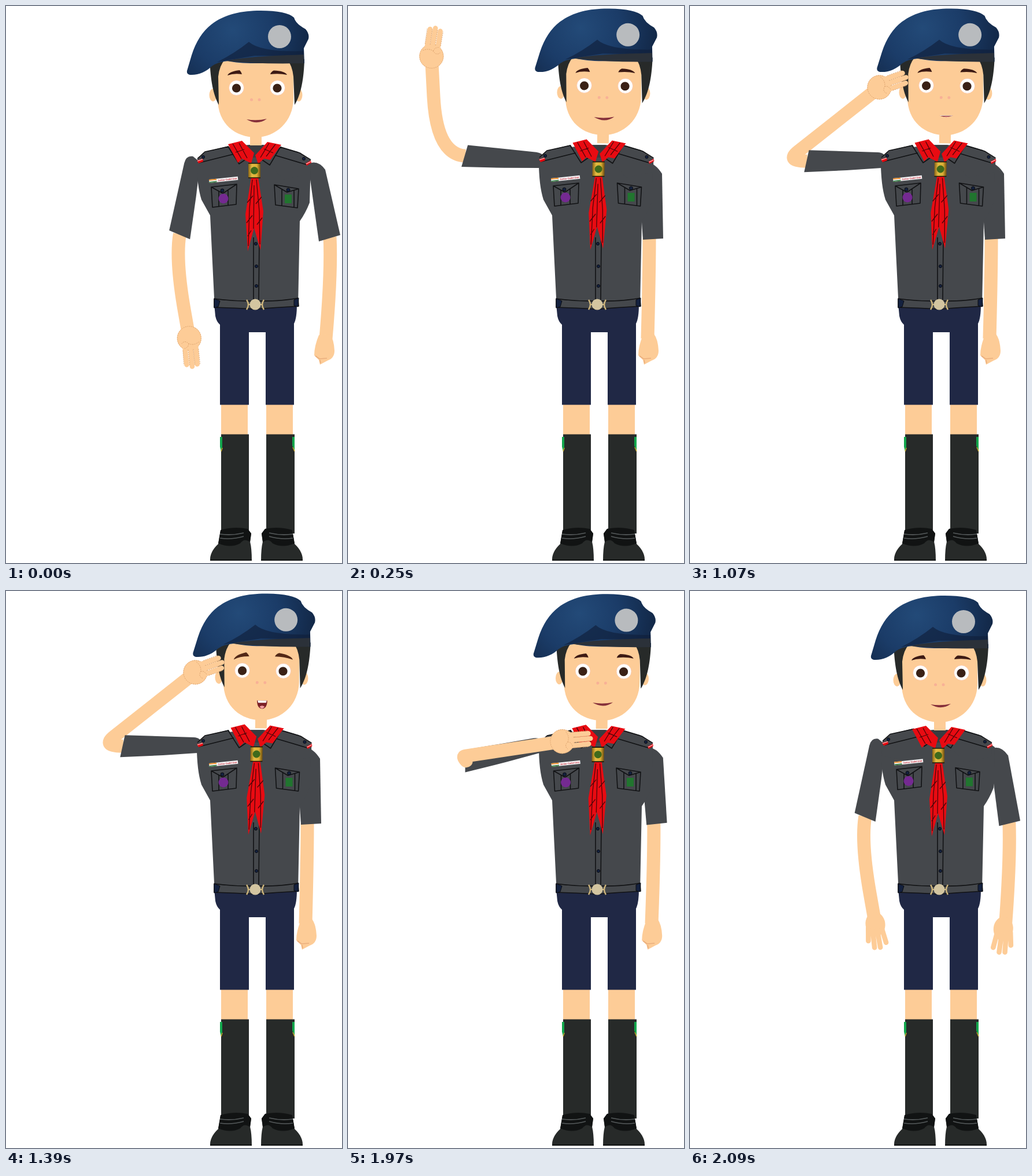
These frames come from a looping animation (581x963 px, 2.14 s). An HTML page:

```html
<!DOCTYPE html>
<html lang="en">
<head>
<meta charset="utf-8">
<title>Scout salute</title>
<style>
  html, body { margin: 0; width: 100%; height: 100%; overflow: hidden; background: #fff; }
  svg { display: block; width: 100vw; height: 100vh; }
  .skin { fill: #fdcc97; }
  .limb { fill: none; stroke: #fdcc97; stroke-width: 23; stroke-linejoin: round; }
  .shirt { fill: #45484c; }
  .navy { fill: #202845; }
  .dark { fill: #272a29; }
  .button { fill: #14213f; stroke: #0b0d12; stroke-width: 1; }
  .red { fill: #e80b12; }
  .seam { fill: none; stroke: #111214; stroke-width: 1.6; stroke-linejoin: round; }
  .crease { fill: none; stroke: #4d0508; stroke-width: 1.3; }
  .finger { fill: none; stroke: #fdcc97; stroke-width: 8.6; stroke-linecap: round; }
  .edge { fill: none; stroke: #d69b66; stroke-width: .8; stroke-dasharray: 2 1.5; }
</style>
</head>
<body>
<svg viewBox="0 0 581 963" preserveAspectRatio="none">
  <defs>
    <radialGradient id="felt" gradientUnits="userSpaceOnUse" cx="392" cy="42" r="135">
      <stop offset="0" stop-color="#234a78"/>
      <stop offset=".5" stop-color="#1b3c68"/>
      <stop offset="1" stop-color="#122746"/>
    </radialGradient>
    <linearGradient id="gold">
      <stop offset="0" stop-color="#8a6414"/>
      <stop offset=".3" stop-color="#e3bb42"/>
      <stop offset=".7" stop-color="#dcae35"/>
      <stop offset="1" stop-color="#6f4f0f"/>
    </linearGradient>
    <g id="shoe">
      <path class="dark" d="M353 959Q352 944 367 930L371 907Q395 898 418 904L424 912L422 926Q425 938 425 959Z"/>
      <path d="M367 929L371 906Q395 899 418 904L424 912L422 927Q412 919 405 929Q388 938 367 929Z" fill="#111313"/>
      <path d="M370 913Q390 916 411 911M370 920Q390 923 411 917" fill="none" stroke="#555a5b" stroke-width="1.5"/>
      <path d="M353 958H425" stroke="#111313" stroke-width="2"/>
    </g>
    <g id="openHand">
      <ellipse class="skin" cx="-1" rx="21" ry="17"/>
      <path class="finger" d="M4 13L26 16M10 6L39 7M10 -2L40 -3M8 -10L33 -14"/>
    </g>
  </defs>

  <!-- legs -->
  <path class="skin" d="M372 685H418V745H372ZM450 685H496V745H450Z"/>
  <path class="dark" d="M372 740.5H420V912H372ZM450 740.5H499V912H450Z"/>
  <path d="M370 745H374V764L372 770L370 762ZM495 745H499V770L495 760Z" fill="#12a64c"/>
  <path d="M372 770L374 764M499 770L496 763" stroke="#c9a52a" stroke-width="1.5"/>
  <use href="#shoe"/>
  <use href="#shoe" transform="matrix(-1 0 0 1 866 0)"/>
  <path class="navy" d="M360 515L362 536Q364 546 370 551V689.5H420V564H449V689.5H498V549Q503 540 503 515Z"/>

  <!-- far layer: arms -->
  <path id="rightFore" class="limb"/>
  <g id="fist">
    <path class="skin" d="M541 569Q533 588 533 604L541 612L543 620L556 613Q568 609 568 596Q567 576 560 567Z"/>
    <path d="M535 605L542 610L555 609M543 612L544 618" fill="none" stroke="#eaae7d" stroke-width="1.6"/>
  </g>
  <use id="rightOpen" href="#openHand"/>
  <path id="foreBack" class="limb"/>
  <path id="leftSleeve" class="shirt" d="M-8 0Q-8 12 6 13L125 19L134 -19L60 -17L0 -14Z"/>
  <path id="rightSleeve" class="shirt"/>

  <!-- shirt -->
  <path class="shirt" d="M330 268L345 254L385 244L420 240H445L475 245L505 254L527 270L525 340Q518 358 508 372L505 520H360L360 505L353 362L338 335Q330 310 330 268Z"/>
  <path d="M415 241H446L440 262H420Z" fill="#393c40"/>
  <path class="seam" d="M428 400V509M438 400L437 508"/>
  <g class="button">
    <circle cx="432" cy="411" r="2.6"/><circle cx="433" cy="450" r="2.6"/><circle cx="433" cy="484" r="2.6"/>
  </g>

  <g id="leftFront">
    <path class="shirt" d="M330 268L332 262L345 252L385 242L403 272L390 300L331 290Z"/>
    <path class="seam" d="M331 264L344 252L385 243M334 271L394 256M384 243L403 273L419 262"/>
    <path class="red" d="M330 267L340 264L341 269L333 272Z"/>
    <path d="M331 268L340 265" stroke="#f6d7d7" stroke-width="1.2"/>
    <circle class="button" cx="341" cy="261" r="2.6"/>
    <g transform="translate(351 300) rotate(-6)">
      <rect width="50" height="6" fill="#f4f2f4"/>
      <rect width="13" height="2" fill="#f0922e"/>
      <rect y="4" width="13" height="2" fill="#3b7f45"/>
      <text x="15" y="4.6" font-size="4" font-weight="bold" fill="#c62d3a" font-family="'Liberation Sans', sans-serif">Junior Cadet Unit</text>
    </g>
    <path class="seam" d="M355 313L399 308L398 343L357 348ZM355 313L375 324L399 308M368 320V347M384 318V345"/>
    <circle class="button" cx="374" cy="319" r="3"/>
    <circle cx="376" cy="333" r="8.5" fill="#742a91"/>
  </g>

  <g id="rightFront">
    <path class="shirt" d="M475 243L505 252L527 267L526 290L480 300L456 274Z"/>
    <path class="seam" d="M474 244L508 254L527 266M465 258L519 274M475 243L456 275L440 264"/>
    <path class="red" d="M518 272L527 267L528 271L520 276Z"/>
    <path d="M519 273L527 269" stroke="#f6d7d7" stroke-width="1.2"/>
    <circle class="button" cx="515" cy="264" r="2.6"/>
    <path class="seam" d="M464 309L506 316L504 349L466 344ZM464 309L486 322L506 316M477 317V345M498 319V348"/>
    <circle class="button" cx="488" cy="318" r="3"/>
    <rect x="482" y="326" width="12" height="15" fill="#21752f"/>
  </g>

  <!-- belt -->
  <path class="seam" style="fill:#45484c" d="M360 506Q395 511 432 510Q475 511 505 505L506 519Q470 521 432 524Q395 522 360 521Z"/>
  <path class="button" d="M360 506L370 510L367 520L360 522ZM506 505L498 508L498 518L505 520Z"/>
  <path d="M416 508Q422 516 416 525M446 508Q440 516 446 525M418 516H444" fill="none" stroke="#cdb57c" stroke-width="2.4"/>
  <circle cx="431" cy="516" r="9.5" fill="#d3c5a0"/>

  <!-- head -->
  <g id="neck"><path class="skin" d="M422 215H442V241H422Z"/></g>
  <g id="scarf">
    <path class="red" d="M384 239L408 233L429 254L424 272L408 264L401 271ZM452 235L476 240L457 266L446 264L436 273L431 258Z"/>
    <path class="red" d="M424 296H436L445 355L440 422L429 384L418 424L414 360Z"/>
    <path class="crease" d="M392 238L407 264M403 237L417 263M397 253L412 248M455 237L440 262M466 239L450 260M446 247L462 254M426 300L421 350L419 415M433 300L438 355L439 412M429 310L428 385M417 340L427 328M432 342L442 330M416 375L426 362M434 378L443 366M418 398L424 388"/>
    <rect x="419" y="272" width="21" height="25" fill="url(#gold)"/>
    <path d="M419 272H440M419 297H440" stroke="#1b1608" stroke-width="1.6"/>
    <circle cx="429.5" cy="284.5" r="6.5" fill="#3f6a1c"/>
  </g>
  <g id="head">
    <ellipse class="skin" cx="358" cy="154" rx="6.5" ry="11"/>
    <ellipse class="skin" cx="506" cy="154" rx="6.5" ry="11"/>
    <path class="skin" d="M366 95V160C366 205 398 227 432 227S497 200 497 160V95Z"/>
    <path class="dark" d="M352 92C354 130 358 152 368 171L367 122Q369 103 379 92ZM516 92C515 130 509 155 499 171L497 122Q495 103 486 92Z"/>
    <path d="M313 112L321 85Q332 50 355 32C378 14 408 8 440 8Q485 8 498 20Q501 31 518 40Q525 48 523 57L515 73L516 99H430Q400 99 384 95Q365 97 356 104C346 114 332 120 318 119Q312 118 313 112Z" fill="url(#felt)"/>
    <path d="M365 97Q395 82 420 62Q440 80 515 78V86H430Z" fill="#101f3b" opacity=".65"/>
    <path d="M380 95Q410 87 515 84V99Q440 101 380 95Z" fill="#2b3139"/>
    <circle cx="473" cy="53" r="20" fill="#b8bbbe"/>
    <path id="browL" d="M383 120Q386 113 404 111Q407 114 408 118Q394 116 383 120Z"/>
    <path id="browR" d="M486 119Q482 112 463 111.500Q458 114 457 118Q472 116 486 119Z"/>
    <g fill="#fff" stroke="#fbc3a3" stroke-width=".8">
      <circle cx="398.5" cy="141.500" r="13"/><circle cx="469.5" cy="141.500" r="13"/>
    </g>
    <g fill="#3a2116">
      <circle cx="398.5" cy="142" r="7.6"/><circle cx="469" cy="142" r="7.6"/>
    </g>
    <g fill="#f8b196">
      <circle cx="424.5" cy="162" r="2.5"/><circle cx="438" cy="162" r="2.5"/>
    </g>
    <path id="smile" d="M416 196Q434 199 451 195Q435 207 416 196Z" fill="#86303a"/>
    <g id="talk">
      <path id="mouth" fill="#7c2027"/>
      <path id="tongue" fill="#f3a0a4"/>
      <path id="teeth" fill="#fff"/>
    </g>
  </g>

  <!-- near layer: saluting arm -->
  <path id="foreFront" class="limb" stroke-linecap="round"/>
  <g id="salute">
    <circle class="skin" r="21"/>
    <circle class="edge" r="20.6"/>
    <path class="finger" d="M10 -10L46 -9M10 -1L49 0M10 9L45 9"/>
    <path class="edge" d="M20 -14L46 -14M20 -5L46 -5M20 4L46 4M20 13L45 14M8 -16Q14 -6 9 2Q2 8 8 14M9 2Q15 2 17 10"/>
  </g>
  <use id="leftOpen" href="#openHand"/>
</svg>

<script>
const el = {};
document.querySelectorAll("[id]").forEach(node => el[node.id] = node);
const set = (id, name, value) => el[id].setAttribute(name, value);
const show = (id, on) => set(id, "display", on ? "inline" : "none");
const mix = (a, b, k) => a + (b - a) * k;

const LOOP = 2140;
const TALK = 9, HOLD = 22, LOWER = 23, LAST = 26;
const talkTimes = start => [0, 80, 165, 250, 330, 415, 495].map(d => start + d);
const steps = [0, 40, 80, 120, 160, 210, 250, 290, 330,
  ...talkTimes(650), ...talkTimes(1230), 1970, 2010, 2050, 2090];

// step, head, left front x y, right front x y, right arm,
// upper angle, forearm angle, elbow distance and rise, forearm length, bend reach, hand angle
const salutePose = [1, 0, -2, 1.5, -3, 0, 179, 321.7, 38, 0, 187, 28, 339.5];
const keys = [
  [0, 0, 0, 0, 0, 0, 1, 99.7, 80, 45, 0, 118, 90, 84],
  [4, 0, .7, -1.5, -2.5, -2, .88, 98.8, 80, 45, 0, 119, 90, 84],
  [6, 1, 0, -2, 1.5, -3, 0, 183, 267, 50, 0, 150, 100, 278],
  [8, ...salutePose],
  [HOLD, ...salutePose],
  [LOWER, .75, .5, -2, 0, -3, .2, 167.5, 351.5, 5, 9, 155, 5, 354],
  [LAST, 0, 2, -4.5, -5, -3.5, .79, 99.5, 440, 45, 0, 125, 90, 442]
];

function poseAt(step) {
  const next = keys.findIndex(k => k[0] >= step);
  const b = keys[next], a = keys[Math.max(0, next - 1)];
  const k = a === b ? 0 : (step - a[0]) / (b[0] - a[0]);
  return a.map((v, i) => mix(v, b[i], k)).slice(1);
}

function move([x, y], angle, length) {
  const r = angle * Math.PI / 180;
  return [x + Math.cos(r) * length, y + Math.sin(r) * length];
}

const place = ([x, y], angle, extra = "") => `translate(${x} ${y}) rotate(${angle}) ${extra}`;

function drawBrow(id, side, x, raise) {
  set(id, "transform", `translate(${x + 2 * side * raise} ${116 + raise}) rotate(${-15 * side * raise}) scale(${1 + .18 * raise}) translate(${-x} -116)`);
  set(id, "fill", `rgb(${mix(61, 104, raise)},${mix(26, 54, raise)},${mix(20, 24, raise)})`);
}

function drawFace(step) {
  const phase = step >= TALK && step <= HOLD ? (step - TALK) % 7 : 6;
  const raise = Math.max(0, 1 - phase / 2);
  drawBrow("browL", 1, 396, raise);
  drawBrow("browR", -1, 471, raise);

  const open = 1 - phase / 6, depth = 17 * open;
  show("smile", open === 0);
  show("talk", open > 0);
  const mid = 433.5, w = mix(13, 8, open), top = 193, low = top + depth;
  const tip = low - depth * .25, t = w * .5;
  set("mouth", "d", `M${mid - w} ${top}H${mid + w}C${mid + w} ${low - 3} ${mid + 4} ${low} ${mid} ${low}S${mid - w} ${low - 3} ${mid - w} ${top}Z`);
  set("teeth", "d", `M${mid - w + 1} ${top}H${mid + w - 1}L${mid + w - 2} ${top + depth * .28}H${mid - w + 2}Z`);
  set("tongue", "d", `M${mid - t} ${tip}Q${mid} ${low - depth * .5} ${mid + t} ${tip}Q${mid} ${low + depth * .2} ${mid - t} ${tip}Z`);
}

function drawLeftArm(step, head, lx, ly, [upper, fore, elbowDist, rise, foreLen, reach, hand]) {
  const shoulder = [322 + 9 * head + lx, 268 + ly];
  const cuff = move(shoulder, upper, 128);
  const elbow = move(move(cuff, upper, elbowDist), upper + 90, rise);
  const wrist = move(elbow, fore, foreLen);
  const palm = move(wrist, fore, 20);
  const d = `M${cuff}Q${elbow} ${move(elbow, fore, reach)}L${palm}`;
  const near = step >= LOWER && step < LAST;
  set("foreFront", "d", near ? d : "");
  set("foreBack", "d", near ? "" : d);
  set("leftSleeve", "transform", place(shoulder, upper));
  set("salute", "transform", place(palm, hand));
  set("leftOpen", "transform", place(palm, hand));
}

function drawRightArm(a) {
  const rest = [515, 272, 530, 269, 543, 290, 545, 402, 510, 404, 505, 330];
  const out = [524, 272, 540, 266, 552, 283, 578, 396, 541, 407, 526, 300];
  const p = rest.map((v, i) => mix(v, out[i], a));
  set("rightSleeve", "d", `M${p[0]} ${p[1]}Q${p[2]} ${p[3]} ${p[4]} ${p[5]}L${p.slice(6).join(" ")}Z`);
  const top = 521 + 39 * a, end = 518 + 35 * a;
  set("rightFore", "d", `M${top} ${402 - 3 * a}Q${mix(521, 563, a)} 460 ${end} 575`);
  set("fist", "transform", `translate(${31 * (a - 1)} 0)`);
  set("rightOpen", "transform", place([end - 4, 585], 96, "scale(1 -1)"));
}

function render(time) {
  const t = time % LOOP;
  const step = steps.filter(s => s <= t).length - 1;
  const [head, lx, ly, rx, ry, right, ...arm] = poseAt(step);
  const headMove = `translate(${9 * head} ${-3.7 * head}) rotate(${.7 * head} 432 230)`;
  set("head", "transform", headMove);
  set("neck", "transform", headMove);
  const lean = -.019 * head;
  set("scarf", "transform", `matrix(1 0 ${lean} 1 ${head - lean * 424} ${-2.5 * head})`);
  set("leftFront", "transform", `translate(${lx} ${ly})`);
  set("rightFront", "transform", `translate(${rx} ${ry})`);
  drawFace(step);
  drawLeftArm(step, head, lx, ly, arm);
  drawRightArm(right);
  const open = step === LAST;
  show("salute", !open);
  show("fist", !open);
  show("leftOpen", open);
  show("rightOpen", open);
}

const start = performance.now();
function tick() {
  render(performance.now() - start);
  requestAnimationFrame(tick);
}
tick();
</script>
</body>
</html>
```
